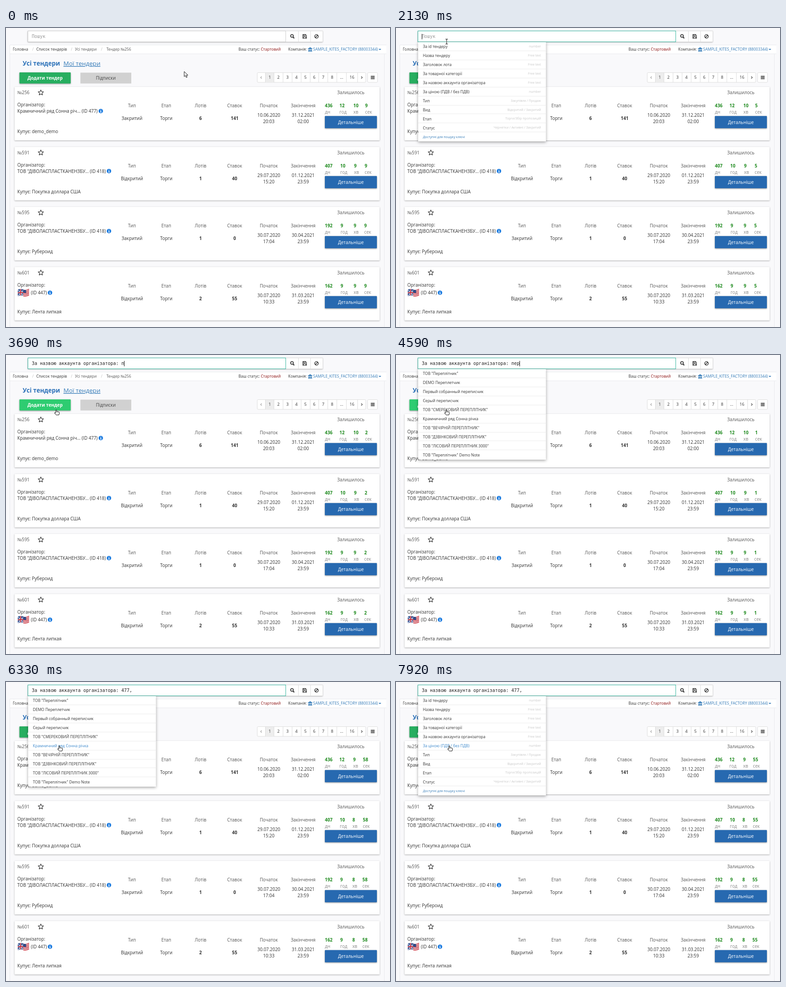
Write an HTML page that moves like this. It is 849 by 660 pixels and loops after 8 s.

```html
<!DOCTYPE html>
<html lang="uk">
<head>
<meta charset="utf-8">
<title>Тендери</title>
<style>
html, body { margin: 0; width: 100%; height: 100%; overflow: hidden; background: #f9f9fb; }
svg { display: block; font: 9.9px "Open Sans", "Noto Sans", sans-serif; }
text { white-space: pre; }
.mono { font: 9.97px "DejaVu Sans Mono", monospace; }
.raised { filter: drop-shadow(0 1px 1.5px rgba(0, 0, 0, .32)); }
.button { filter: drop-shadow(0 1.4px 1.8px rgba(0, 0, 0, .42)); }
.menu { filter: drop-shadow(0 2px 3.2px rgba(0, 0, 0, .36)); }
</style>
</head>
<body>
<svg id="stage" width="849" height="660" viewBox="0 0 849 660"></svg>
<script>
const LOOP = 8000;
const svg = document.getElementById('stage');
const DARK = '#333', GREY = '#555', BLUE = '#337ab7', LINE = '#ddd';

function add(tag, attrs, parent = svg) {
  const node = document.createElementNS('http://www.w3.org/2000/svg', tag);
  for (const key in attrs) node.setAttribute(key, attrs[key]);
  return parent.appendChild(node);
}
const rect = (x, y, width, height, fill, more, parent) =>
  add('rect', { x, y, width, height, fill, ...more }, parent);
const path = (d, more, parent) => add('path', { d, fill: 'none', ...more }, parent);
function label(x, y, text, fill = DARK, more = {}, parent = svg) {
  const node = add('text', { x, y, fill, ...more }, parent);
  node.textContent = text;
  return node;
}
const MID = { 'text-anchor': 'middle' };
const BOLD = { 'font-weight': 700 };
const SMALL = { 'font-size': 8.5 };
const TINY = { 'font-size': 7.08 };
const RAISED = { class: 'raised', rx: 1 };
const BUTTON = { class: 'button', rx: 1 };

// Page frame and breadcrumbs
rect(8, 38, 833, 18.5, '#fff');
path('M8 37.5H841M8 57H841', { stroke: '#e9eaee' });
path('M8.5 38V660M836.5 57V660', { stroke: '#e9eaee' });
[[15, 'Головна', DARK], [58, '/', '#bbb'], [67, 'Список тендерів', DARK], [143.5, '/', '#bbb'],
 [152.5, 'Усі тендери', GREY], [210, '/', '#bbb'], [222, 'Тендер №256', GREY],
 [514, 'Ваш статус:', DARK], [563.5, 'Стартовий', '#8b1010'], [624, 'Компанія:', DARK],
 [679, 'SAMPLE_KITES_FACTORY (88003344)', BLUE]
].forEach(([x, text, fill]) => label(x, 50, text, fill, SMALL));
path('M667.5 45.5L672.5 42.5L677.5 45.5V46.5H667.5ZM669 47H670.5V50H669ZM671.8 47H673.2V50H671.8ZM674.5 47H676V50H674.5ZM668 50H677V51.8H668Z', { fill: BLUE });
path('M824 46H829.5L826.7 49Z', { fill: BLUE });

// Search bar
rect(48, 6.5, 652, 24, '#fff', { class: 'raised' });
path('M619.5 6.5H700.5V30.5H619.5M646.5 6.5V30.5M673.5 6.5V30.5', { stroke: LINE });
path('M634.8 20.3L637.3 22.8', { stroke: '#222', 'stroke-width': 2 });
add('circle', { cx: 632.3, cy: 17.6, r: 3, fill: 'none', stroke: '#222', 'stroke-width': 1.5 });
path('M656.3 14.4H662.3L664.4 16.5V22.7H656.3ZM658 14.5V17.2H661.5V14.5M658 22.5V19.3H662.7V22.5', { stroke: '#222', 'stroke-width': 1.1 });
add('circle', { cx: 686.5, cy: 18.5, r: 3.9, fill: 'none', stroke: '#222', 'stroke-width': 1.4 });
path('M683.8 21.2L689.2 15.8', { stroke: '#222', 'stroke-width': 1.3 });
const field = rect(48.5, 6.5, 570, 24, '#fff', { stroke: '#ccc' });
const query = label(57, 22, '', DARK, { class: 'mono' });
const caret = rect(57, 13, 1, 12, '#111');

// Heading, buttons, pagination
const title = { 'font-size': 13.5 };
label(37, 83, 'Усі тендери', '#2a70b8', { ...title, ...BOLD });
label(127, 83, 'Мої тендери', BLUE, { ...title, 'text-decoration': 'underline' });
const addButton = rect(29.7, 98, 113.3, 24.6, '#27ae60', BUTTON);
label(86.3, 114.3, 'Додати тендер', '#fff', { ...BOLD, ...MID });
rect(164.5, 98.5, 112.5, 24, '#d1d1d1');
label(220.7, 114.3, 'Підписки', '#444', MID);

rect(555.5, 98.5, 240, 21.5, '#fff', { stroke: LINE, rx: 2 });
rect(573, 99, 19, 20.5, '#ededed');
[573, 592, 612, 632, 652, 672, 691, 711, 731, 752, 777].forEach(x =>
  path(`M${x + .5} 98.5V120`, { stroke: LINE }));
[[583, 1], [602.3, 2], [622.3, 3], [642, 4], [662, 5], [681.5, 6], [701.3, 7], [721, 8], [742, '...'], [765, 16]]
  .forEach(([x, n]) => label(x, 112.2, n, DARK, { 'font-size': 9, ...MID }));
path('M565.3 106.8L563 109.3L565.3 111.8', { stroke: '#999', 'stroke-width': 1.1 });
path('M785.4 106.8L787.8 109.3L785.4 111.8', { stroke: DARK, 'stroke-width': 1.1 });
rect(799.5, 98.5, 22, 21.5, '#fff', { stroke: LINE, rx: 2 });
path('M806.5 106.4H815M806.5 109.2H815M806.5 112H815', { stroke: '#222', 'stroke-width': 1.5 });

// Tender cards
const BUILDER = 'ТОВ "ДІВОЛАСПЛАСТКАНЕНЗБУ... (ID 418)';
const tenders = [
  { no: 256, owner: 'Крамничний ряд Сонна річ... (ID 477)', buys: 'demo_demo', type: 'Закритий', lots: 6, bids: 141,
    from: '10.06.2020 20:03', to: '31.12.2021 02:00', days: 436, hours: 12, mins: 10,
    before: [737.3, 768, 794], after: [737, 767.5, 789.3] },
  { no: 591, owner: BUILDER, buys: 'Покупка доллара США', type: 'Відкритий', lots: 1, bids: 40,
    from: '29.07.2020 15:20', to: '01.12.2021 23:59', days: 407, hours: 10, mins: 9,
    before: [739, 769.5, 793], after: [738, 766, 789] },
  { no: 595, owner: BUILDER, buys: 'Рубероид', type: 'Закритий', lots: 1, bids: 0,
    from: '30.07.2020 17:04', to: '30.04.2021 23:59', days: 192, hours: 9, mins: 9,
    before: [739.7, 768.8, 792], after: [739, 765.7, 788] },
  { no: 601, owner: '(ID 447)', flag: true, buys: 'Лента липкая', type: 'Відкритий', lots: 2, bids: 55,
    from: '30.07.2020 10:33', to: '31.03.2021 23:59', days: 162, hours: 9, mins: 9,
    before: [739.7, 768.8, 792], after: [739, 765.7, 788] }
];
const COLUMNS = [278.5, 354.3, 430, 505.5, 581, 657];

function drawFlag(g) {
  path('M26 180Q32 177 39 180V194Q32 191 26 195Z', { fill: '#274a8c' }, g);
  path('M26 180.5L39 193.5M26 194.5L39 180.5', { stroke: '#dde', 'stroke-width': 1.5 }, g);
  path('M26 187.5Q32 185 39 187M32.3 178.7V192.5', { stroke: '#eee', 'stroke-width': 3 }, g);
  path('M26 187.5Q32 185 39 187M32.3 178.7V192.5', { stroke: '#c8202f', 'stroke-width': 1.8 }, g);
  path('M38 180Q44 182 51 178V192Q44 196 38 194Z', { fill: '#eee' }, g);
  for (let y = 181; y < 195; y += 3.2)
    path(`M38 ${y}Q44 ${y + 2} 51 ${y - 2}`, { stroke: '#cf3340', 'stroke-width': 1.7 }, g);
  path('M38 180Q41 181 44.5 181V187.5Q41 187.5 38 186.5Z', { fill: '#2d4a86' }, g);
}

function star(cx, cy) {
  const points = Array.from({ length: 10 }, (_, i) => {
    const r = i % 2 ? 2.9 : 6.2, a = i * Math.PI / 5;
    return [cx + r * Math.sin(a), cy - r * Math.cos(a)].map(v => v.toFixed(2)).join(' ');
  });
  return `M${points.join('L')}Z`;
}

const counters = tenders.map((item, i) => {
  const g = add('g', { transform: `translate(0 ${i * 132.5})` });
  const put = (x, y, text, fill, more) => label(x, y, text, fill, more, g);
  rect(19, 130, 807, 118, '#fff', RAISED, g);
  put(25, 146, '№' + item.no, GREY);
  path(star(77, 142.8), { stroke: '#222', 'stroke-width': 1.1, 'stroke-linejoin': 'round' }, g);
  put(762.5, 146, 'Залишилось', GREY, MID);
  put(25, 173, 'Організатор:');
  const shift = item.flag ? 3.5 : 0;
  if (item.flag) drawFlag(g);
  const owner = put(item.flag ? 55 : 25, 187 + shift, item.owner);
  const cx = +owner.getAttribute('x') + owner.getComputedTextLength() + 7;
  const cy = 183.3 + shift;
  add('circle', { cx, cy, r: 4.9, fill: '#1f7de0' }, g);
  path(`M${cx - 1} ${cy - .5}H${cx + .2}V${cy + 2.5}M${cx - 1.3} ${cy + 2.5}H${cx + 1.5}M${cx - .5} ${cy - 2.5}H${cx + .7}`, { stroke: '#fff', 'stroke-width': 1.3 }, g);
  put(25, 232, 'Купує: ' + item.buys);

  ['Тип', 'Етап', 'Лотів', 'Ставок', 'Початок', 'Закінчення'].forEach((text, c) => put(COLUMNS[c], 175, text, GREY, MID));
  [item.type, 'Торги', item.lots, item.bids].forEach((text, c) =>
    put(COLUMNS[c], 203, text, DARK, c > 1 ? { ...MID, ...BOLD } : MID));
  [item.from, item.to].forEach((date, c) => date.split(' ').forEach((text, row) =>
    put(COLUMNS[c + 4], 196 + row * 14.2, text, DARK, MID)));

  put(705, 175, item.days, '#1e8a1e', BOLD);
  put(705, 189, 'дн', '#888');
  const units = ['год', 'хв', 'сек'].map(text => ({
    value: put(0, 175, '', '#1e8a1e', BOLD), name: put(0, 189, text, '#888')
  }));
  rect(705, 194.2, 115, 27, '#2769b0', BUTTON, g);
  put(762.5, 211.6, 'Детальніше', '#fff', MID);
  return { item, units };
});

// Drop-down menus
const ROW = 19.93, MENU_TOP = 31;
const keys = [
  ['За id тендеру', 'number'], ['Назва тендеру', 'Free text'], ['Заголовок лота', 'Free text'],
  ['За товарної категорії', 'Free text'], ['За назвою аккаунта організатора', 'Free text'],
  ['За ціною (ПДВ / без ПДВ)', 'number'], ['Тип', 'Закупівля / Продаж'], ['Вид', 'Відкритий / Закритий'],
  ['Етап', 'Торги/Збір пропозицій'], ['Статус', 'Чернетки / Активні / Закритий']
];
const firms = [
  'ТОВ "Переплітник"', 'DEMO Переплетчик', 'Первый собранный переписчик', 'Серый переписчик',
  'ТОВ "СМЕРЕКОВИЙ ПЕРЕПЛІТНИК"', 'Крамничний ряд Сонна річка', 'ТОВ "ВЕЧІРНІЙ ПЕРЕПЛІТНИК"',
  'ТОВ "ДЗВІНКОВИЙ ПЕРЕПЛІТНИК"', 'ТОВ "ЛІСОВИЙ ПЕРЕПЛІТНИК 3000"', 'ТОВ "Переплітник" Demo Note'
].map(name => [name]);

function buildMenu(rows, footer) {
  const g = add('g', {});
  rect(49, MENU_TOP, 282.5, ROW * rows.length + (footer ? 20 : .7), '#fff', { class: 'menu' }, g);
  const items = rows.map(([text, hint], i) => {
    const y = MENU_TOP + ROW * i;
    if (i < rows.length - 1 || footer) path(`M49 ${Math.round(y + ROW) - .5}H331.5`, { stroke: '#ececec' }, g);
    if (hint) label(320.5, y + 12, hint, '#c8c8c8', { ...TINY, 'text-anchor': 'end' }, g);
    return label(59.5, y + 13.2, text, DARK, SMALL, g);
  });
  if (footer) label(59.5, 243.3, footer, BLUE, TINY, g);
  return { g, items };
}
const keyMenu = buildMenu(keys, 'Доступні для пошуку ключі');
const firmMenu = buildMenu(firms);

// Pointers, hot spot at 0,0
const ink = { stroke: '#111', fill: '#fff', 'stroke-linejoin': 'round' };
const pointers = {
  arrow: path('M0 0V11.3L2.6 8.9L4.5 13.2L6.5 12.3L4.7 8.2H8.2Z', ink),
  hand: path('M-1 1Q0 -.5 1 1V4.5L6 5.4Q7.3 5.8 7 7.5L6 11.8H-.3L-3.8 7.7Q-4 6.3 -2.7 6.6L-1 7.8Z', ink),
  beam: add('g', {})
};
for (const [stroke, width] of [['#fff', 2.6], ['#111', 1.1]])
  path('M-2.6 -5.5H-.8L0 -4.7L.8 -5.5H2.6M0 -4.7V4.7M-2.6 5.5H-.8L0 4.7L.8 5.5H2.6', { stroke, 'stroke-width': width }, pointers.beam);

// Timeline
const ticks = [30, 690, 1350, 1920, 2520, 3120, 3690, 4290, 4890, 5490, 6090, 6660, 7290, 7890];
const caretOn = [[1650, 1890], [2130, 2430], [2730, 2970], [3030, 3210], [3630, 4920], [5190, 5520], [6360, 7080], [7260, 7800]];
const PREFIX = 'За назвою аккаунта організатора: ';
const typed = [[0, ''], [2970, PREFIX], [3630, PREFIX + 'п'], [3900, PREFIX + 'пе'], [4200, PREFIX + 'пер'],
  [6330, PREFIX + '477,'], [7260, PREFIX + '477, ']];
const route = [[0, 394, 96], [660, 394, 96], [750, 385, 90], [1350, 385, 90], [1710, 112, 30], [2130, 112, 30],
  [2640, 111, 120.5], [5160, 111, 120.5], [5520, 113, 104], [5700, 113, 104], [5730, 115, 116.5], [6030, 118, 140.5], [LOOP, 118, 140.5]];

const within = (t, from, to) => t >= from && t < to;
const ramp = (t, from, span) => Math.min(1, Math.max(0, (t - from) / span));
const mix = (a, b, k) => `rgb(${a.map((v, i) => Math.round(v + (b[i] - v) * k))})`;
const show = (node, on) => node.setAttribute('visibility', on ? 'visible' : 'hidden');

function pointerAt(t) {
  const i = Math.max(1, route.findIndex(([time]) => time > t));
  const [t0, x0, y0] = route[i - 1], [t1, x1, y1] = route[i];
  const k = ramp(t, t0, t1 - t0), e = k * k * (3 - 2 * k);
  return [x0 + (x1 - x0) * e, y0 + (y1 - y0) * e];
}

function drawCounters(t) {
  const passed = ticks.filter(tick => t >= tick).length;
  const rolled = passed > 9;
  const secs = (69 - passed) % 60;
  for (const { item, units } of counters) {
    const xs = rolled ? item.after : item.before;
    [item.hours, item.mins - rolled, secs].forEach((value, i) => {
      units[i].value.textContent = value;
      units[i].value.setAttribute('x', xs[i]);
      units[i].name.setAttribute('x', xs[i]);
    });
  }
}

function draw(t) {
  drawCounters(t);

  const text = typed.filter(([time]) => t >= time).pop()[1];
  query.textContent = text || 'Пошук';
  query.setAttribute('fill', text ? '#222' : '#999');
  caret.setAttribute('x', Math.round(57 + text.length * 6));
  show(caret, caretOn.some(([from, to]) => within(t, from, to)));
  const focus = within(t, 2970, 3030) ? .4 : ramp(t, 1620, 90);
  field.setAttribute('stroke', mix([204, 204, 204], [52, 180, 158], focus));

  const keysOpen = within(t, 1740, 3030) || t >= 7500;
  const firmsOpen = within(t, 4560, 6345);
  show(keyMenu.g, keysOpen);
  show(firmMenu.g, firmsOpen);

  const [x, y] = pointerAt(t);
  const idle = within(t, 4560, 5190) || within(t, 7500, 7560);
  const hovered = idle ? -1 : Math.floor((pointerAt(Math.max(0, t - 60))[1] - MENU_TOP) / ROW);
  for (const menu of [keyMenu, firmMenu])
    menu.items.forEach((node, i) => node.setAttribute('fill', i === hovered ? '#3a87cb' : DARK));

  const hot = ramp(t, 3030, 120) - ramp(t, 4590, 120);
  addButton.setAttribute('fill', mix([39, 174, 96], [46, 204, 113], hot));

  const overButton = within(x, 30, 143) && within(y, 98, 123);
  const kind = y < MENU_TOP ? 'beam' : keysOpen || firmsOpen || overButton ? 'hand' : 'arrow';
  for (const name in pointers) show(pointers[name], name === kind);
  pointers[kind].setAttribute('transform', `translate(${x.toFixed(1)} ${y.toFixed(1)})`);
}

const start = performance.now();
function frame() {
  draw((performance.now() - start) % LOOP);
  requestAnimationFrame(frame);
}
frame();
</script>
</body>
</html>
```
